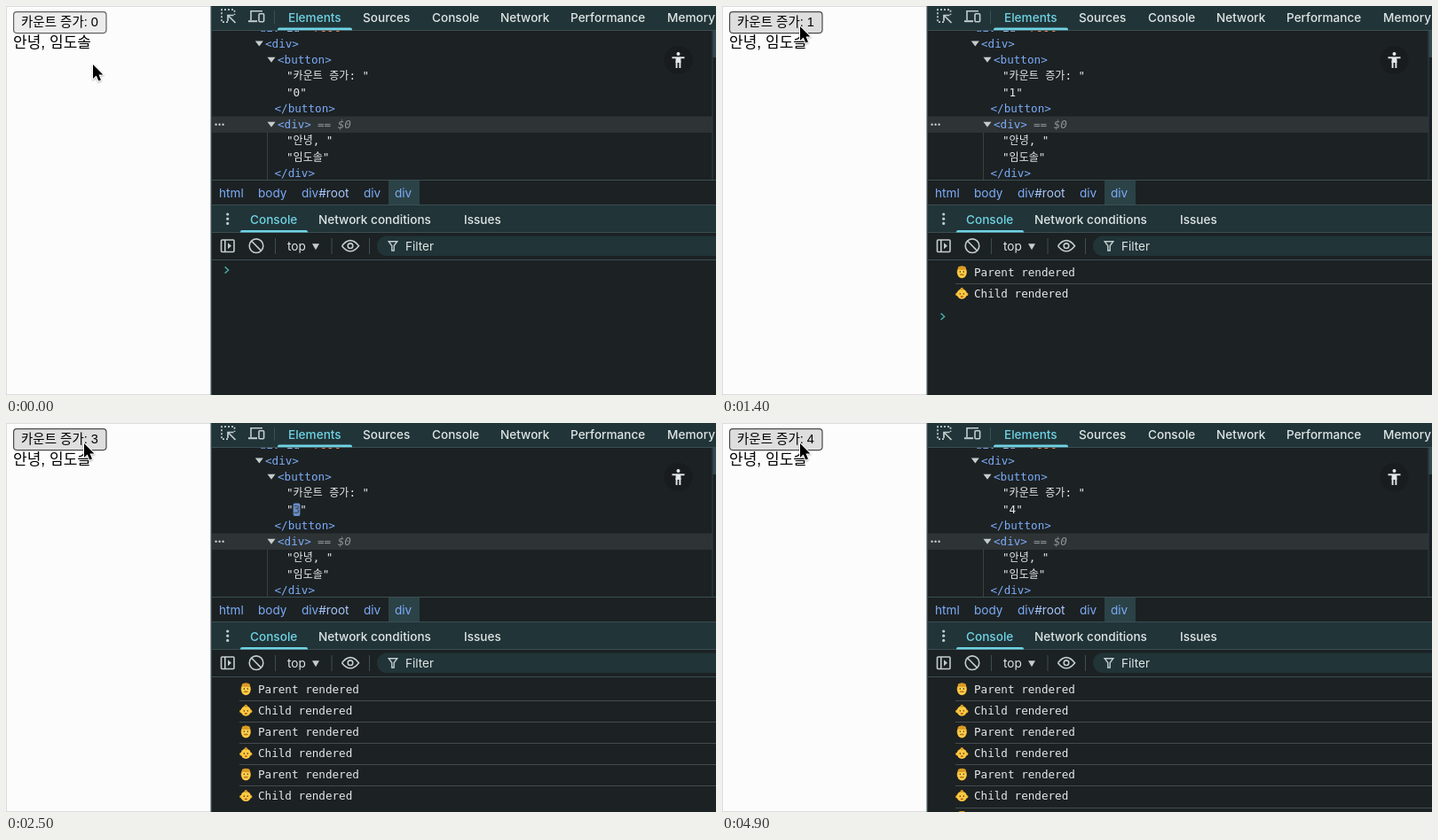
Recreate the animation shown at these times as an HTML page with a canvas. Size 800x439 px, loop 5 s.

```html
<!DOCTYPE html>
<html lang="ko">
<head>
<meta charset="utf-8">
<title>Render log</title>
<style>
html, body { margin: 0; width: 100%; height: 100%; overflow: hidden; background: #fcfcfc; }
canvas { display: block; width: 800px; height: 439px; }
</style>
</head>
<body>
<canvas id="stage"></canvas>
<script>
const W = 800, H = 439, LOOP = 5000;
const CLICKS = [800, 1600, 2400, 3000];
const NAME = '임도솔';
const UI = 'Inter, Roboto, sans-serif';
const MONO = '"DejaVu Sans Mono", "Liberation Mono", monospace';
const SANS = '"Liberation Sans", Arial, sans-serif';
const KR = '"Noto Sans CJK KR", "Noto Sans CJK", "Noto Sans CJK JP", sans-serif';
const BG = '#1c2123', BAR = '#213438', LINE = '#3b4f53';
const TEXT = '#dfe5e5', ICON = '#c3cdce', BLUE = '#7cacf8', CYAN = '#6fd3e3';

const canvas = document.getElementById('stage');
const ctx = canvas.getContext('2d');
const dpr = window.devicePixelRatio || 1;
canvas.width = W * dpr;
canvas.height = H * dpr;

function rect(x, y, w, h, color) {
  ctx.fillStyle = color;
  ctx.fillRect(x, y, w, h);
}

function pill(x, y, w, h, r, fill, stroke, lw = 1) {
  ctx.beginPath();
  ctx.roundRect(x, y, w, h, r);
  if (fill) { ctx.fillStyle = fill; ctx.fill(); }
  if (stroke) { ctx.strokeStyle = stroke; ctx.lineWidth = lw; ctx.stroke(); }
}

function poly(points, fill) {
  ctx.beginPath();
  points.forEach(([x, y]) => ctx.lineTo(x, y));
  ctx.closePath();
  ctx.fillStyle = fill;
  ctx.fill();
}

function line(points, color, lw = 1.4) {
  ctx.beginPath();
  points.forEach(([x, y]) => ctx.lineTo(x, y));
  ctx.strokeStyle = color;
  ctx.lineWidth = lw;
  ctx.stroke();
}

function oval(x, y, rx, ry, fill) {
  ctx.beginPath();
  ctx.ellipse(x, y, rx, ry, 0, 0, Math.PI * 2);
  ctx.fillStyle = fill;
  ctx.fill();
}

function ring(x, y, r, color, lw = 1.5) {
  ctx.beginPath();
  ctx.arc(x, y, r, 0, Math.PI * 2);
  ctx.strokeStyle = color;
  ctx.lineWidth = lw;
  ctx.stroke();
}

function text(str, x, y, font, color) {
  ctx.font = font;
  ctx.fillStyle = color;
  ctx.fillText(str, x, y);
  return x + ctx.measureText(str).width;
}

// Hangul and Latin runs each get their own font.
function mixed(str, x, y, latin, hangul, color) {
  for (const run of str.match(/[가-힣]+|[^가-힣]+/g)) {
    x = text(run, x, y, /[가-힣]/.test(run) ? hangul : latin, color);
  }
  return x;
}

const ui = (s, x, y, color = TEXT, weight = 400) => text(s, x, y, `${weight} 13.6px ${UI}`, color);
const mono = (s, x, y, color = '#e6e8e8') => mixed(s, x, y, `12.62px ${MONO}`, `12px ${KR}`, color);
const mix = (a, b, p) => `rgb(${a.map((v, i) => Math.round(v + (b[i] - v) * p))})`;

function page(count, hover) {
  rect(0, 0, 231, H, '#fcfcfc');
  rect(0, 0, 231, 1, '#dcdcdc');
  rect(0, 0, 1, H, '#dcdcdc');
  rect(0, H - 1, 231, 1, '#dcdcdc');
  pill(8.6, 6.6, 104.4, 24, 3.5, hover ? '#dedede' : '#ececec', hover ? '#4a4a4a' : '#626262', 1.2);
  mixed(`카운트 증가: ${count}`, 17, 23, `14.6px ${SANS}`, `14.5px ${KR}`, '#000');
  mixed(`안녕, ${NAME}`, 8, 47, `17.5px ${SANS}`, `17px ${KR}`, '#000');
}

function arrowDown(x, y, w = 9, h = 6, color = ICON) {
  poly([[x - w / 2, y - h / 2], [x + w / 2, y - h / 2], [x, y + h / 2]], color);
}

function topBar() {
  rect(232, 0, W - 232, 27, BAR);
  rect(232, 27, W - 232, 1, LINE);
  ctx.setLineDash([2, 2]);
  line([[250, 18.2], [243, 18.2], [243, 4.2], [257.5, 4.2], [257.5, 10]], ICON, 1.7);
  ctx.setLineDash([]);
  line([[250, 17], [250, 10.5], [256.5, 10.5]], ICON, 1.7);
  line([[250, 10.5], [258.5, 19]], ICON, 1.7);
  line([[289, 5.8], [276, 5.8], [276, 16]], ICON, 1.6);
  line([[273, 17.2], [283, 17.2]], ICON, 2);
  pill(285, 8.8, 5.6, 9, 1, null, ICON, 1.6);
  rect(302, 5, 1, 15, LINE);
  ui('Elements', 318, 18, CYAN, 500);
  [['Sources', 402], ['Console', 480], ['Network', 557], ['Performance', 636], ['Memory', 745]]
    .forEach(([s, x]) => ui(s, x, 18, TEXT, 500));
  pill(306, 24.6, 84, 2.6, [2, 2, 0, 0], CYAN);
}

function digit(count, age, y) {
  const fade = Math.min(1, age / 450);
  const lit = count > 0 && fade < 1;
  if (lit) pill(323.6, y - 11, 7.8, 14.5, 2, mix([124, 172, 248], [28, 33, 35], fade));
  const ink = count > 0 ? Math.min(1, age / 500) : 1;
  mono('"', 316, y);
  mono(String(count), 323.6, y, mix([28, 33, 35], [230, 232, 232], ink));
  mono('"', 331.2, y);
}

function elements(count, age) {
  const row = i => 46.8 + 18.25 * i;
  ctx.save();
  ctx.beginPath();
  ctx.rect(232, 28, W - 232, 168);
  ctx.clip();
  rect(232, 124.5, 564, 18.5, '#2e3335');
  rect(294, 143, 1, 53, '#3a4143');

  let x = mono('<div ', 278, 28.6, BLUE);
  x = mono('id', x, 28.6, '#a8c7fa');
  x = mono('="', x, 28.6, BLUE);
  x = mono('root', x, 28.6, '#fe8d59');
  mono('">', x, 28.6, BLUE);

  arrowDown(285.3, 42.6);
  arrowDown(299, 60.8);
  arrowDown(299, 133.8);
  mono('<div>', 292, row(0), BLUE);
  mono('<button>', 306, row(1), BLUE);
  mono('"카운트 증가: "', 316, row(2));
  digit(count, age, row(3));
  mono('</button>', 302.5, row(4), BLUE);
  mono('<div>', 306, row(5), BLUE);
  text('== $0', 351, row(5), `italic 12.62px ${MONO}`, '#8d9596');
  for (let i = 0; i < 3; i++) oval(236.6 + i * 4, 133.8, 1.2, 1.2, ICON);
  mono('"안녕, "', 316, row(6));
  mono(`"${NAME}"`, 316, row(7));
  mono('</div>', 302.5, row(8), BLUE);

  rect(795.5, 28, 1, 168, '#2d4246');
  rect(796.5, 28, 4, 30, '#34494d');
  ctx.restore();

  oval(757.5, 61, 16, 16, '#191c1e');
  oval(757.5, 54, 2, 2, '#e4e8e8');
  line([[750.5, 58.3], [764.5, 58.3]], '#e4e8e8', 1.9);
  rect(754.6, 58, 5.8, 6, '#e4e8e8');
  line([[755.6, 62], [755.6, 70]], '#e4e8e8', 1.9);
  line([[759.4, 62], [759.4, 70]], '#e4e8e8', 1.9);
}

function crumbs() {
  rect(232, 196, W - 232, 1, LINE);
  rect(431, 197, 35, 27, '#2b4247');
  [['html', 240], ['body', 284], ['div', 403], ['div', 438]].forEach(([s, x]) => ui(s, x, 215.7, BLUE));
  ui('#root', ui('div', 333, 215.7, BLUE), 215.7, '#a8c7fa');
}

function drawer() {
  rect(232, 224, W - 232, 32, BAR);
  rect(232, 224, W - 232, 1, LINE);
  rect(232, 255, W - 232, 1, LINE);
  for (let i = 0; i < 3; i++) oval(249.7, 235 + i * 5.2, 1.6, 1.6, ICON);
  ui('Console', 275, 245.8, CYAN, 500);
  ui('Network conditions', 352, 245.8, TEXT, 500);
  ui('Issues', 516, 245.8, TEXT, 500);
  pill(264, 253, 76, 2.6, [2, 2, 0, 0], CYAN);

  pill(242.5, 264, 14.5, 13.5, 1, null, ICON, 1.6);
  line([[246.8, 264], [246.8, 277.5]], ICON, 1.6);
  poly([[250, 267.3], [250, 274.3], [254, 270.8]], ICON);
  ring(282, 270.7, 7.8, ICON, 1.6);
  line([[276.6, 265.3], [287.4, 276.1]], ICON, 1.6);
  rect(303, 262, 1, 18, LINE);
  ui('top', 317, 275.7);
  arrowDown(349, 271.8, 8, 7);
  rect(366.5, 262, 1, 18, LINE);

  ctx.beginPath();
  ctx.moveTo(378.5, 270.7);
  ctx.quadraticCurveTo(388, 258.5, 397.5, 270.7);
  ctx.quadraticCurveTo(388, 282.9, 378.5, 270.7);
  ctx.strokeStyle = ICON;
  ctx.lineWidth = 1.6;
  ctx.stroke();
  ring(388, 270.7, 2.8, ICON, 1.6);
  rect(409, 262, 1, 18, LINE);

  pill(418, 259.5, 400, 22.5, 11.2, BAR);
  line([[431.2, 265.7], [440.8, 265.7], [437.2, 270.6], [437.2, 276], [434.8, 276], [434.8, 270.6], [431.2, 265.7], [440.8, 265.7]], ICON, 1.4);
  ui('Filter', 450, 275.8);
  rect(232, 286, W - 232, 1, LINE);
}

function eyes(x, y) {
  oval(x - 2, y, 0.7, 0.9, '#5b3713');
  oval(x + 2, y, 0.7, 0.9, '#5b3713');
}

function parentFace(x, y) {
  oval(x, y, 5.6, 6.9, '#e3a52c');
  oval(x, y + 0.6, 4.8, 5.8, '#fbd04c');
  oval(x, y - 4.6, 4.6, 2.2, '#d99a24');
  eyes(x, y - 0.4);
  oval(x, y + 3, 2.7, 1, '#b9791c');
}

function childFace(x, y) {
  oval(x - 5.6, y + 1, 1.5, 1.8, '#eeb02f');
  oval(x + 5.6, y + 1, 1.5, 1.8, '#eeb02f');
  oval(x, y + 0.6, 5.6, 5.7, '#fbc840');
  oval(x, y - 5.2, 1.7, 1.5, '#d99a24');
  eyes(x, y + 0.4);
  oval(x, y + 3.5, 1.6, 0.9, '#b0551f');
}

function log(count) {
  const rows = count * 2;
  for (let i = 0; i < rows; i++) {
    const y = 300.3 + 24.1 * i;
    const parent = i % 2 === 0;
    (parent ? parentFace : childFace)(270.3, y);
    mono(`${parent ? 'Parent' : 'Child'} rendered`, 284, y + 4.6);
    if (i < rows - 1) rect(263, Math.round(y + 12.7), W - 263, 1, '#454c4e');
  }
  const y = rows ? 302.3 + 24.1 * rows : 298;
  line([[246.6, y - 3.6], [250.6, y], [246.6, y + 3.6]], '#45a69f', 1.5);
}

function pointer(x, y) {
  const shape = [[0, 0], [0, 16], [3.7, 12.6], [6.3, 18.6], [9, 17.4], [6.5, 11.6], [11.4, 11.4]]
    .map(([a, b]) => [x + a, y + b]);
  ctx.save();
  ctx.lineJoin = 'round';
  ctx.shadowColor = 'rgba(0,0,0,.3)';
  ctx.shadowBlur = 2 * dpr;
  ctx.shadowOffsetY = dpr;
  line([...shape, shape[0], shape[1]], '#fff', 2);
  ctx.restore();
  poly(shape, '#000');
}

function draw(t) {
  const count = CLICKS.filter(c => t >= c).length;
  const age = count ? t - CLICKS[count - 1] : 0;
  const p = Math.min(1, t / 500);
  const ease = p * p * (3 - 2 * p);
  const px = 98 - 10 * ease, py = 66 - 43 * ease;

  ctx.setTransform(dpr, 0, 0, dpr, 0, 0);
  rect(0, 0, W, H, BG);
  elements(count, age);
  topBar();
  crumbs();
  drawer();
  log(count);
  page(count, py < 31);
  rect(230.5, 0, 1.5, H, LINE);
  pointer(px, py);
}

function tick() {
  draw(performance.now() % LOOP);
  requestAnimationFrame(tick);
}
tick();
</script>
</body>
</html>
```
